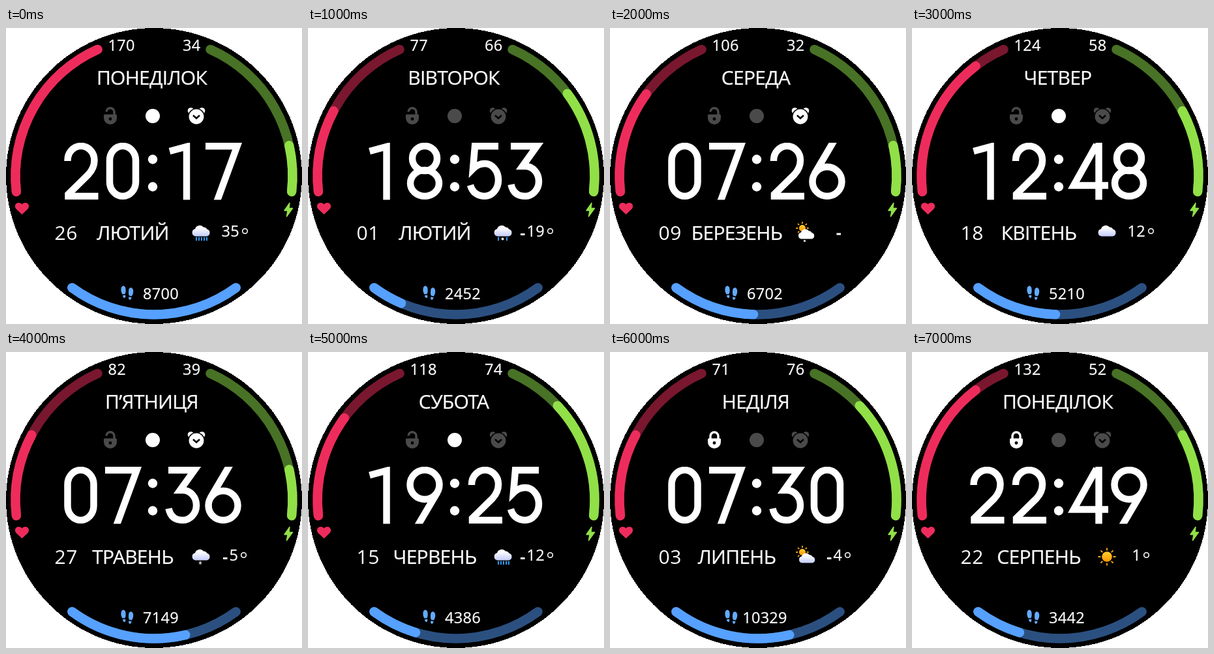
Recreate the animation shown at these times as an HTML page. Size 454 by 454 pixels, loop 8 s.

```html
<!DOCTYPE html>
<html lang="uk">
<head>
<meta charset="utf-8">
<title>Watch face</title>
<style>
  html, body { margin: 0; width: 100%; height: 100%; overflow: hidden; background: #fff; }
  svg { display: block; width: 454px; height: 454px; }
  text { font-family: "Open Sans", "Noto Sans", sans-serif; fill: #fff; stroke: #fff; stroke-opacity: .4; stroke-width: .7px; }
  .word { font-size: 30px; letter-spacing: -.75px; text-anchor: middle; }
  .num { font-size: 23.5px; letter-spacing: .3px; }
  .date { font-size: 30px; letter-spacing: .6px; stroke: none; }
  .arc { fill: none; stroke-width: 14.4; stroke-linecap: round; }
  .digit { fill: none; stroke: #fff; stroke-width: 10.5; }
</style>
</head>
<body>
<svg viewBox="0 0 454 454">
  <defs>
    <linearGradient id="cloudFill" x1="0" y1="0" x2="0" y2="1">
      <stop offset=".2" stop-color="#fff"/><stop offset="1" stop-color="#c3ccfa"/>
    </linearGradient>
    <linearGradient id="sunFill" x1="0" y1="0" x2="0" y2="1">
      <stop offset="0" stop-color="#ffd02e"/><stop offset="1" stop-color="#ff9500"/>
    </linearGradient>
    <clipPath id="band"><rect x="80" y="176" width="290" height="87.500"/></clipPath>
  </defs>
  <circle cx="227" cy="227" r="227" shape-rendering="crispEdges"/>
  <g id="arcs"></g>

  <path fill="#ee2c5c" d="M24.500 286L15.500 277.500C10.500 271.500 18.500 264 24.500 270.500C30.500 264 38.500 271.500 33.500 277.500Z"/>
  <path fill="#91e048" stroke="#91e048" stroke-width="1.500" stroke-linejoin="round" d="M435 268.500L427 280H432L430.500 289L439.500 276.500H434Z"/>
  <g fill="#63abff">
    <path d="M176.500 400C177 394 183 394 183.500 400C184 404 183.500 406 182.500 408L178.500 408.500C177 406 176 403 176.500 400ZM178.800 410.300L183 409.500C184.500 415 180 416 178.800 410.300Z"/>
    <path d="M195.200 403C194.700 397 188.700 397 188.200 402C187.700 406 188 409 188.800 410.500L192.800 411.500C194.500 409 195.500 406 195.200 403ZM188.400 412.300L192.600 413.200C191.500 419 187 417.500 188.400 412.300Z"/>
  </g>

  <g id="lock">
    <path d="M150 134Q150 132.500 151.500 132.500H168.500Q170 132.500 170 134V138A10 10 0 0 1 150 138Z"/>
    <path id="shackle" fill="none" stroke-width="3.400"/>
    <circle cx="160" cy="139.500" r="2.400" fill="#000"/>
  </g>
  <circle id="link" cx="225" cy="135" r="11"/>
  <g id="alarm">
    <circle cx="283.500" cy="127" r="4.800"/><circle cx="300.500" cy="127" r="4.800"/>
    <circle cx="292" cy="136" r="12.200" stroke="#000" stroke-width="1.500"/>
    <path fill="none" stroke="#000" stroke-width="2.600" d="M287 134L292 138.500L297 134"/>
  </g>

  <g id="clock" role="img" clip-path="url(#band)"></g>
  <g fill="#fff"><circle cx="225" cy="201.500" r="7.200"/><circle cx="225" cy="243.500" r="7.200"/></g>

  <text id="pulse" class="num" x="156.500" y="35"></text>
  <text id="charge" class="num" x="298.500" y="35" text-anchor="end"></text>
  <text id="day" class="word" x="223.500" y="86.500"></text>
  <text id="date" class="date" x="74.500" y="324.500"></text>
  <text id="month" class="word" x="194.500" y="324.500"></text>
  <text id="steps" class="num" x="237.500" y="416" text-anchor="middle"></text>
  <g id="weather"></g>
  <g id="temp"></g>
</svg>
<script>
const STEP = 1000, SWEEP = 72.5, DIM = '#4a4a4a';
const $ = id => document.getElementById(id);

// day, time, date, month, pulse + arc, charge + arc, steps + arc, icons on (lock, link, alarm), weather, temperature
const states = [
  ['ПОНЕДІЛОК', '2017', '26', 'ЛЮТИЙ', 170, 72.5, 34, 19.2, 8700, 72.5, '011', 'rain', '35'],
  ['ВІВТОРОК', '1853', '01', 'ЛЮТИЙ', 77, 34.5, 66, 43, 2452, 13, '000', 'sleet', '-19'],
  ['СЕРЕДА', '0726', '09', 'БЕРЕЗЕНЬ', 106, 42.8, 32, 19.2, 6702, 34.4, '001', 'sunSnow', '-'],
  ['ЧЕТВЕР', '1248', '18', 'КВІТЕНЬ', 124, 59, 58, 34.5, 5210, 34.4, '010', 'cloud', '12'],
  ['П’ЯТНИЦЯ', '0736', '27', 'ТРАВЕНЬ', 82, 34.5, 39, 19.2, 7149, 49.4, '011', 'snow', '-5'],
  ['СУБОТА', '1925', '15', 'ЧЕРВЕНЬ', 118, 42.8, 74, 49.4, 4386, 19.3, '010', 'rain', '-12'],
  ['НЕДІЛЯ', '0730', '03', 'ЛИПЕНЬ', 71, 34.5, 76, 49.4, 10329, 49.4, '100', 'sunCloud', '-4'],
  ['ПОНЕДІЛОК', '2249', '22', 'СЕРПЕНЬ', 132, 59, 52, 34.5, 3442, 19.3, '100', 'sun', '1'],
];

// start angle, direction, dim colour, bright colour
const gauges = [
  [173.5, 1, '#79172f', '#ee2c5c'],
  [6.5, -1, '#487225', '#91e048'],
  [126.25, -1, '#2b5080', '#56a0ff'],
];

// digit strokes around x = 0, cut off at the top and bottom of the clock band
const glyphs = [
  'M-20 27A20 22 0 0 1 20 27V60A20 22 0 0 1 -20 60Z',
  'M-20 13L6 6V90',
  'M-20 28V27A20.5 22 0 0 1 21 27C21 37 17 43 12 48.500L-19 79V82H27',
  'M-22 5.3H18L-4 36H0A21 23 0 0 1 0 82C-12 82 -19 76 -21.500 64',
  'M12 3L-23 65.500H30M15.500 0V90',
  'M21 5.3H-15L-18 40C-12 34 -5 32 0 32A21 25 0 0 1 0 82C-11 82 -19 76 -22 65',
  'M12.3 -6L-19.500 48M-22.500 59.500A22.500 22.500 0 1 1 22.500 59.500A22.500 22.500 0 1 1 -22.500 59.500',
  'M-27 5.3H21.500L-11 94',
  'M0 5A19 19 0 0 1 0 43A19 19 0 0 1 0 5ZM0 42A22 20 0 0 1 0 82A22 20 0 0 1 0 42Z',
  'M-12.3 93L19.500 39M-22.500 27.500A22.500 22.500 0 1 1 22.500 27.500A22.500 22.500 0 1 1 -22.500 27.500',
];
const slots = [114.5, 179, 271, 333];

function arc([start, dir], sweep) {
  const at = deg => {
    const a = deg * Math.PI / 180;
    return `${227 + 212.5 * Math.cos(a)} ${227 + 212.5 * Math.sin(a)}`;
  };
  return `M${at(start)}A212.5 212.5 0 0 ${dir > 0 ? 1 : 0} ${at(start + dir * sweep)}`;
}
const stroke = (d, color, width) =>
  `<path d="${d}" fill="none" stroke="${color}" stroke-width="${width}" stroke-linecap="round"/>`;
const dot = (x, y, r, fill = '#fff') => `<circle cx="${x}" cy="${y}" r="${r}" fill="${fill}"/>`;

function cloud(fill = 'url(#cloudFill)') {
  return `<path fill="${fill}" d="M290.500 319.500A5.700 5.700 0 0 1 290 308.300A7.500 7.500 0 0 1 303 305.500A6.500 6.500 0 0 1 308.500 308.800A5.500 5.500 0 0 1 308 319.500Z"/>`;
}
const smallCloud = fill => `<g transform="translate(32 36) scale(.9)">${cloud(fill)}</g>`;

function sun(x, y, r, rayLength) {
  let rays = '';
  for (let i = 0; i < 8; i++) {
    const a = i * Math.PI / 4, c = Math.cos(a), s = Math.sin(a), p = r + 2.5, q = p + rayLength;
    rays += `M${x + p * c} ${y + p * s}L${x + q * c} ${y + q * s}`;
  }
  return stroke(rays, '#ffae1a', 1.8) + dot(x, y, r, 'url(#sunFill)');
}
const drops = xs => stroke(xs.map(x => `M${x} 321.5V325.5`).join(''), '#2f9bf2', 2);

const weather = {
  rain: () => cloud() + drops([292, 296, 300, 304, 308]),
  sleet: () => cloud() + drops([292, 305]) + dot(298.5, 323.5, 1.9),
  sunSnow: () => sun(295, 307, 5, 1.5) + smallCloud('#fff') + dot(298.5, 326.5, 1.6),
  cloud: () => cloud(),
  snow: () => cloud() + stroke('M298 321V326M296 322.300L300 324.700M300 322.300L296 324.700', '#fff', .9),
  sunCloud: () => sun(295, 307, 5, 1.5) + `<g transform="translate(1 0)">${smallCloud()}</g>`,
  sun: () => sun(299, 314, 7.8, 2.5),
};

function temperature(value) {
  if (value === '-') return '<path fill="#fff" d="M347.500 314.500H354V317.500H347.500Z"/>';
  const minus = value[0] === '-', digits = value.replace('-', '');
  const width = (minus ? 10 : 0) + 14 * digits.length + 12;
  const left = 351 - width / 2, x = left + (minus ? 9.5 : -.5);
  return (minus ? `<path fill="#fff" d="M${left} 315H${left + 6.5}V318H${left}Z"/>` : '') +
    `<text class="num" x="${x}" y="319.500">${digits}</text>` +
    `<circle cx="${left + width - 4.5}" cy="311.500" r="3.800" fill="none" stroke="#fff" stroke-width="1.600"/>`;
}

$('arcs').innerHTML = gauges.map(g =>
  `<path class="arc" stroke="${g[2]}" d="${arc(g, SWEEP)}"/><path class="arc level" stroke="${g[3]}"/>`).join('');
const levels = document.querySelectorAll('.level');

function show([day, time, date, month, pulse, pulseArc, charge, chargeArc, steps, stepsArc, icons, sky, temp]) {
  Object.entries({ day, date, month, pulse, charge, steps }).forEach(([id, value]) => $(id).textContent = value);
  [pulseArc, chargeArc, stepsArc].forEach((sweep, i) => levels[i].setAttribute('d', arc(gauges[i], sweep)));

  $('clock').setAttribute('aria-label', time.slice(0, 2) + ':' + time.slice(2));
  $('clock').innerHTML = [...time].map((n, i) =>
    `<path class="digit" transform="translate(${slots[i]} 176)" d="${glyphs[n]}"/>`).join('');

  ['lock', 'link', 'alarm'].forEach((id, i) => $(id).setAttribute('fill', icons[i] === '1' ? '#fff' : DIM));
  const locked = icons[0] === '1';
  $('shackle').setAttribute('stroke', locked ? '#fff' : DIM);
  $('shackle').setAttribute('d', locked
    ? 'M154 133V129A6 6 0 0 1 166 129V133'
    : 'M154 128.500A6 6 0 0 1 166 129V133');

  $('weather').innerHTML = weather[sky]();
  $('temp').innerHTML = temperature(temp);
}

const begin = performance.now();
let current = -1;
function tick() {
  const index = Math.floor((performance.now() - begin) / STEP) % states.length;
  if (index !== current) show(states[current = index]);
  requestAnimationFrame(tick);
}
tick();
</script>
</body>
</html>
```
